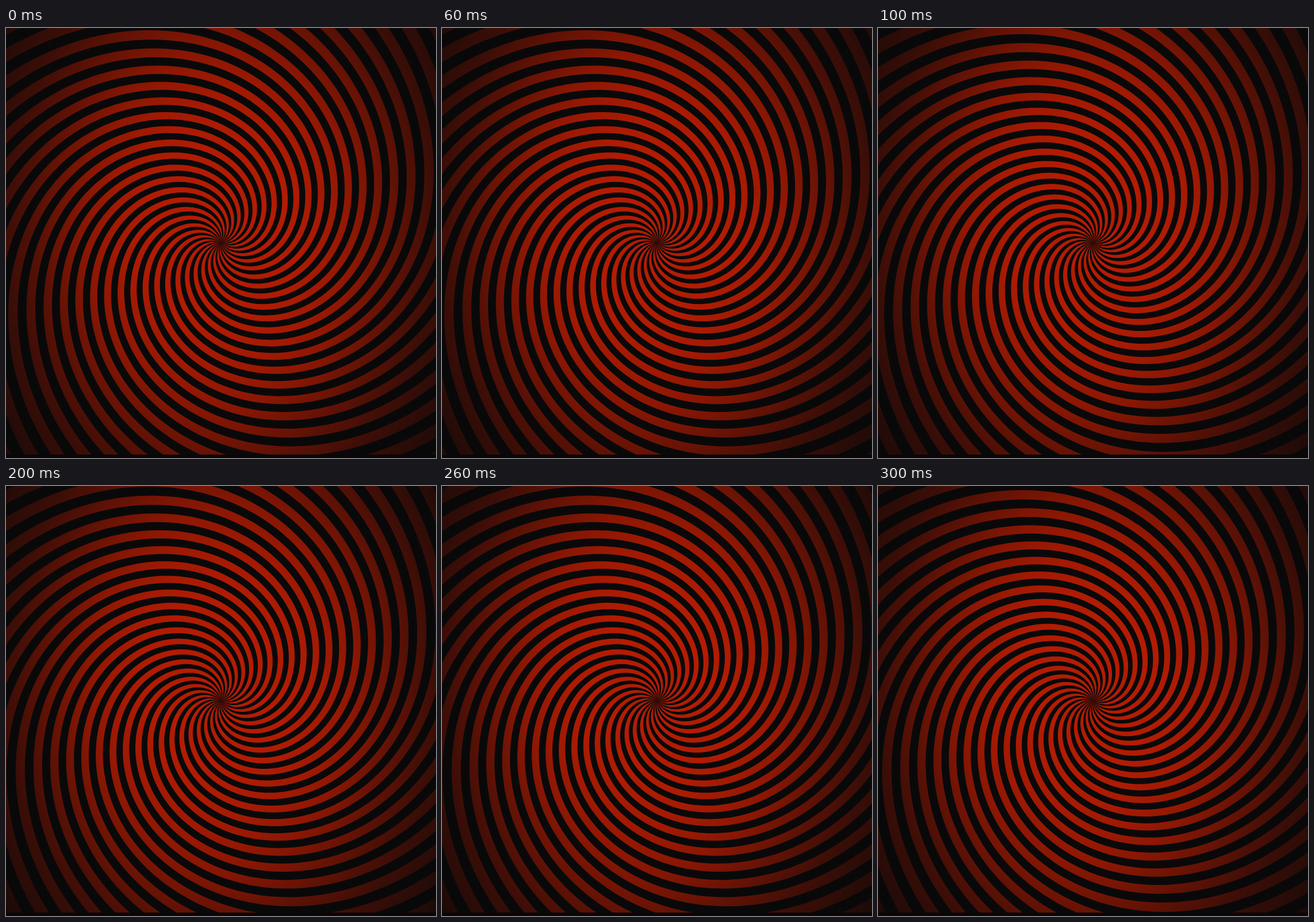
An HTML page with a canvas for the animation above (0.4 s loop, 748 by 748 pixels).

```html
<!DOCTYPE html>
<html>
<head>
<meta charset="utf-8">
<title>Spiral</title>
<style>
html, body { margin: 0; width: 100%; height: 100%; overflow: hidden; background: #0a090a; }
canvas { display: block; }
</style>
</head>
<body>
<canvas id="stage" width="748" height="748"></canvas>
<script>
const SIZE = 748, MID = 374, REACH = 540;
const ARMS = 24, PITCH = 2 * Math.PI / ARMS;
const RAD = Math.PI / 180;
const PHASE = -105.1 * RAD;
const FILL = 0.51;           // share of each pitch that is red
const STEP = 4.5 * RAD, STEP_MS = 100, STEPS = 4;

const ctx = document.getElementById('stage').getContext('2d');

// Angle an arm has turned back at radius r; the twist eases off outwards
const twist = r => (0.755 * r - 0.00041 * r * r) * RAD;

function fade(outer, stops) {
  const g = ctx.createRadialGradient(0, 0, 0, 0, 0, outer);
  for (const [at, color] of stops) g.addColorStop(at, color);
  return g;
}

function edge(path, start, outward) {
  const n = 180;
  for (let i = 0; i <= n; i++) {
    const r = REACH * (outward ? i : n - i) / n;
    const a = start - twist(r);
    path.lineTo(r * Math.cos(a), r * Math.sin(a));
  }
}

const spiral = new Path2D();
for (let i = 0; i < ARMS; i++) {
  const a = PHASE + i * PITCH, half = PITCH * FILL / 2;
  spiral.moveTo(0, 0);
  edge(spiral, a - half, true);
  edge(spiral, a + half, false);
  spiral.closePath();
}

let seed = 7;
function rand() {
  seed = (seed * 16807) % 2147483647;
  return seed / 2147483647;
}

// Worn patches: x, y, spread, count
const patches = [
  [166, -90, 22, 60], [83, -78, 14, 30], [209, 213, 12, 30],
  [235, 235, 45, 70], [-255, -30, 25, 35], [-195, -60, 30, 40],
  [-80, -208, 22, 30], [285, 130, 30, 30], [120, 115, 30, 35], [150, -175, 30, 40]
];
const specks = new Path2D();
for (const [x, y, spread, count] of patches) {
  for (let i = 0; i < count; i++) {
    const a = rand() * 2 * Math.PI, d = spread * rand();
    specks.rect(x + d * Math.cos(a), y + d * Math.sin(a), 1, 1);
  }
}

const red = fade(300, [[0, '#4a0d05'], [0.03, '#8a1604'], [0.08, '#b41c04'], [1, '#b01b02']]);
const shade = a => `rgba(9,8,9,${a})`;
const vignette = fade(470, [
  [0, shade(0)], [0.2, shade(0)], [0.3, shade(0.03)], [0.4, shade(0.11)],
  [0.5, shade(0.23)], [0.6, shade(0.4)], [0.7, shade(0.56)], [0.8, shade(0.7)], [1, shade(0.88)]
]);

function draw(step) {
  ctx.setTransform(1, 0, 0, 1, 0, 0);
  ctx.fillStyle = '#0a090a';
  ctx.fillRect(0, 0, SIZE, SIZE);

  ctx.translate(MID, MID);
  ctx.rotate(step * STEP);
  ctx.fillStyle = red;
  ctx.fill(spiral);
  ctx.fillStyle = 'rgba(75,14,6,0.5)';
  ctx.fill(specks);

  ctx.setTransform(1, 0, 0, 4 / 3, MID, 348);
  ctx.fillStyle = vignette;
  ctx.fillRect(-MID, -MID, SIZE, SIZE);

  ctx.setTransform(1, 0, 0, 1, 0, 0);
  ctx.fillStyle = '#0a0607';
  ctx.fillRect(0, 742, SIZE, 6);
}

function tick(now) {
  draw(Math.floor(now / STEP_MS) % STEPS);
  requestAnimationFrame(tick);
}
draw(0);
requestAnimationFrame(tick);
</script>
</body>
</html>
```
